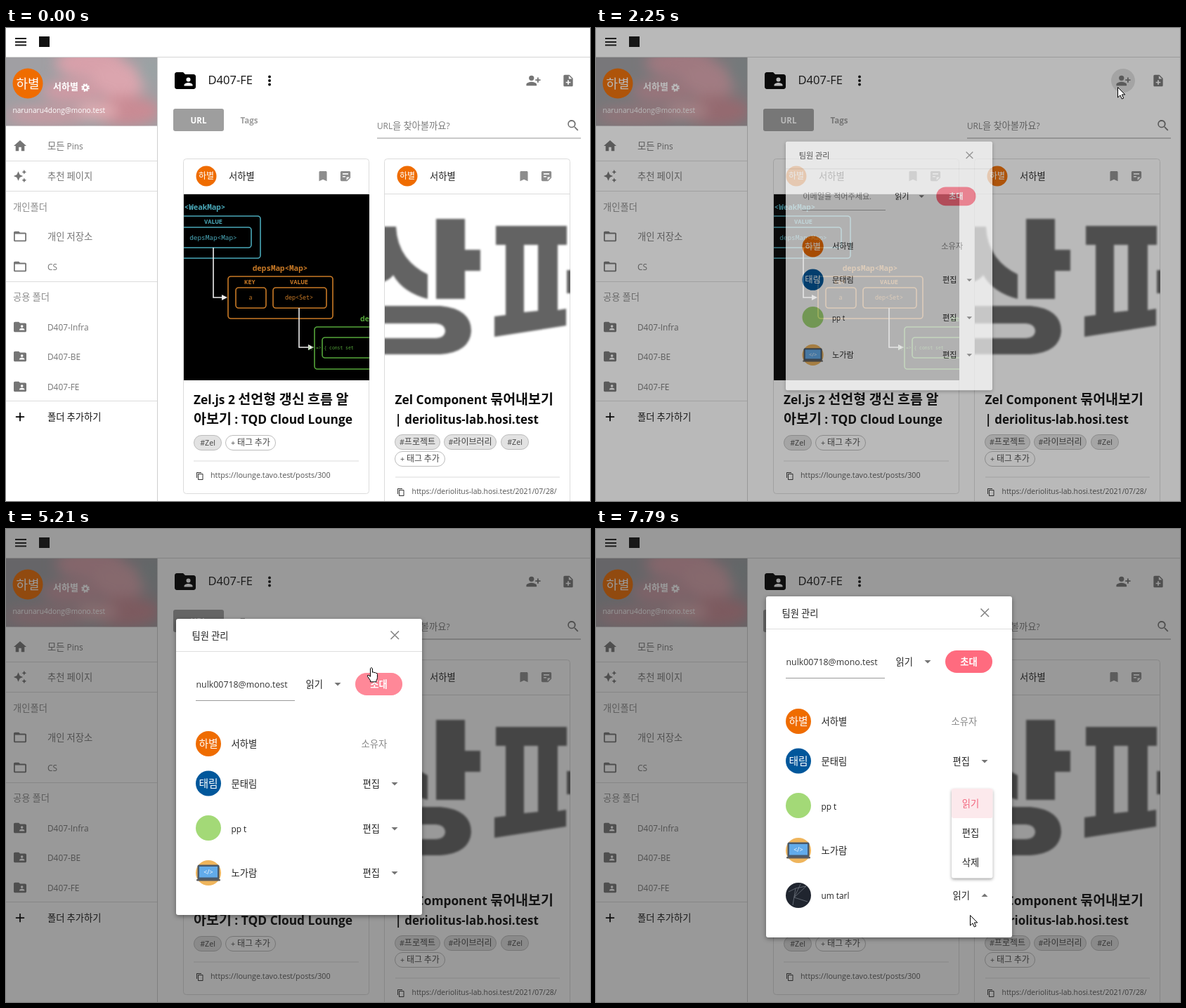
Write an HTML page that moves like this. It is 831 by 674 pixels and loops after 8 s.

```html
<!DOCTYPE html>
<html lang="ko">
<head>
<meta charset="utf-8">
<title>Team invite</title>
<style>
html, body { margin: 0; width: 100%; height: 100%; overflow: hidden; background: #fff; }
svg { display: block; }
text { font-family: "Open Sans", "Noto Sans CJK KR", "Noto Sans CJK JP", sans-serif; }
.code text { font-family: "Noto Sans Mono", "DejaVu Sans Mono", monospace; }
.soft { filter: blur(9px); }
.rough { filter: blur(1.4px); }
#panel { filter: drop-shadow(0 2px 3px rgba(0,0,0,.4)); }
#menu > rect:first-child { filter: drop-shadow(0 2px 2px rgba(0,0,0,.35)); }
</style>
</head>
<body>
<svg id="stage" width="831" height="674"></svg>
<script>
const GREY = '#757575', ORANGE = '#ef6c00', PINK = '#ff6b7f', LINE = '#dcdcdc';
const OWNER = '서하별', MAIL = 'nulk00718@mono.test';

const ICON = {
  home: 'M10 20v-6h4v6h5v-8h3L12 3 2 12h3v8z',
  stars: 'M19 9l1.25-2.75L23 5l-2.75-1.25L19 1l-1.25 2.75L15 5l2.75 1.25zm-7.5.5L9 4 6.5 9.5 1 12l5.5 2.5L9 20l2.5-5.5L17 12zM19 15l-1.25 2.75L15 19l2.75 1.25L19 23l1.25-2.75L23 19l-2.75-1.25z',
  folder: 'M20 6h-8l-2-2H4c-1.1 0-2 .9-2 2v12c0 1.1.9 2 2 2h16c1.1 0 2-.9 2-2V8c0-1.1-.9-2-2-2zm0 12H4V8h16z',
  shared: 'M20 6h-8l-2-2H4c-1.1 0-2 .9-2 2v12c0 1.1.9 2 2 2h16c1.1 0 2-.9 2-2V8c0-1.1-.9-2-2-2zm-5 3a2 2 0 1 1 0 4 2 2 0 1 1 0-4zm4 8h-8v-1c0-1.33 2.67-2 4-2s4 .67 4 2z',
  invite: 'M9 4a4 4 0 1 0 0 8 4 4 0 1 0 0-8zM9 14c-2.67 0-8 1.34-8 4v2h16v-2c0-2.66-5.33-4-8-4zM18 10V7h2v3h3v2h-3v3h-2v-3h-3v-2z',
  addDoc: 'M14 2H6c-1.1 0-2 .9-2 2v16c0 1.1.9 2 2 2h12c1.1 0 2-.9 2-2V8zm2 14h-3v3h-2v-3H8v-2h3v-3h2v3h3zm-3-7V3.5L18.5 9z',
  search: 'M15.5 14h-.8l-.27-.27A6.5 6.5 0 1 0 13.7 14.4l.3.3v.8l5 5L20.5 19zm-6 0a4.5 4.5 0 1 1 0-9 4.5 4.5 0 1 1 0 9z',
  mark: 'M17 3H7c-1.1 0-2 .9-2 2v16l7-3 7 3V5c0-1.1-.9-2-2-2z',
  note: 'M19 3H5a2 2 0 0 0-2 2v14a2 2 0 0 0 2 2h10l6-6V5a2 2 0 0 0-2-2zM7 7h10v2H7zm5 7H7v-2h5zm2 5.5V14h5.5z',
  copy: 'M16 1H4c-1.1 0-2 .9-2 2v14h2V3h12zm3 4H8c-1.1 0-2 .9-2 2v14c0 1.1.9 2 2 2h11c1.1 0 2-.9 2-2V7c0-1.1-.9-2-2-2zm0 16H8V7h11z',
  plus: 'M19 13h-6v6h-2v-6H5v-2h6V5h2v6h6z'
};

// Drawing helpers
const esc = s => s.replace(/&/g, '&amp;').replace(/</g, '&lt;').replace(/>/g, '&gt;');
const text = (x, y, s, size = 13.3, fill = GREY, more = '') =>
  `<text x="${x}" y="${y}" font-size="${size}" fill="${fill}" ${more}>` +
  s.replace(/[ -~]+/g, r => `<tspan font-size="${size * .89}">${esc(r)}</tspan>`) + '</text>';
const mid = 'text-anchor="middle"', bold = 'font-weight="700"';
const rect = (x, y, w, h, fill, more = '') =>
  `<rect x="${x}" y="${y}" width="${w}" height="${h}" fill="${fill}" ${more}/>`;
const disc = (x, y, r, fill, more = '') => `<circle cx="${x}" cy="${y}" r="${r}" fill="${fill}" ${more}/>`;
const path = (d, fill, more = '') => `<path d="${d}" fill="${fill}" ${more}/>`;
const icon = (name, x, y, size, fill = GREY) =>
  path(ICON[name], fill, `fill-rule="evenodd" transform="translate(${x - size / 2} ${y - size / 2}) scale(${size / 24})"`);
const avatar = (x, y, r, s, fill, size) =>
  disc(x, y, r, fill) + text(x, y + size * .37, s, size, '#fff', mid);
const caretDown = (x, y, id = '') => path(`M${x - 4.5} ${y - 2}h9l-4.5 4.5z`, GREY, id);
const chip = (x, y, w, s, plain) =>
  rect(x + .5, y + .5, w - 1, 21, plain ? '#fff' : '#e2e2e2', 'rx="10.5" stroke="#bcbcbc"') +
  text(x + w / 2, y + 15, s, 12, '#444', mid);

function sidebar() {
  const cloud = [[120, 50, 50, 22, '#d8a0aa'], [160, 75, 40, 25, '#dba5ae'], [95, 90, 45, 16, '#cf9aa4'],
    [170, 118, 50, 22, '#c98b94'], [60, 125, 60, 14, '#c59aa2'], [130, 118, 30, 12, '#deacb2'], [205, 60, 18, 22, '#9aa2a4']];
  const rows = [['home', '모든 Pins', 168], ['stars', '추천 페이지', 211], ['folder', '개인 저장소', 297], ['folder', 'CS', 340],
    ['shared', 'D407-Infra', 426], ['shared', 'D407-BE', 468], ['shared', 'D407-FE', 511]];
  return `<svg x="0" y="42" width="215" height="97.5" viewBox="0 42 215 97.5">` + rect(0, 42, 215, 98, '#a09fa3') +
    '<g class="soft">' + cloud.map(([x, y, a, b, c]) => `<ellipse cx="${x}" cy="${y}" rx="${a}" ry="${b}" fill="${c}"/>`).join('') + '</g></svg>' +
    avatar(31, 79, 21.5, OWNER.slice(1), ORANGE, 18) +
    text(67, 88, OWNER, 13, '#fff', bold) +
    disc(113, 85, 3.2, 'none', 'stroke="#fff" stroke-width="2.4"') +
    disc(113, 85, 5, 'none', 'stroke="#fff" stroke-width="1.6" stroke-dasharray="2.2 1.73"') +
    text(9.5, 121, 'narunaru4dong@mono.test', 11.4, '#fff') +
    [189, 232, 361, 531].map(y => rect(0, y, 215, 1, LINE)).join('') +
    rect(215, 42, 1, 632, '#cfcfcf') +
    rows.map(([i, s, y]) => icon(i, 20, y, i == 'stars' ? 20 : 21.6) + text(59, y + 5, s)).join('') +
    text(10, 260, '개인폴더', 13.3, '#8c8c8c') + text(10, 388, '공용 폴더', 13.3, '#8c8c8c') +
    icon('plus', 20, 554, 21, '#000') + text(59, 558.5, '폴더 추가하기', 13.3, '#111');
}

function cardHead(x) {
  return rect(x + .5, 186.5, 264, x < 300 ? 477 : 520, '#fff', `rx="4" stroke="${LINE}"`) +
    avatar(x + 33, 211, 14.5, OWNER.slice(1), ORANGE, 12) + text(x + 65, 215.5, OWNER, 13.3, '#222') +
    icon('mark', x + 199, 211, 19, '#8d8d8d') + icon('note', x + 231, 211, 19, '#8d8d8d') +
    rect(x + 1, 236, 263, 1, LINE);
}

function diagram() {
  const box = (x, y, w, h, c) => rect(x, y, w, h, 'none', `rx="4" stroke="${c}" stroke-width="1.6"`);
  const label = (x, y, s, size, c, more = mid) => `<text x="${x}" y="${y}" font-size="${size}" fill="${c}" ${more}>${esc(s)}</text>`;
  const arrow = (x, y, y2, x2) => path(`M${x} ${y}V${y2}H${x2 - 4}`, 'none', 'stroke="#eee" stroke-width="1.6"') +
    path(`M${x2 - 6} ${y2 - 4}L${x2 + 2} ${y2}L${x2 - 6} ${y2 + 4}z`, '#eee');
  const teal = '#4aa8b8', amber = '#c97a26', green = '#55a63a';
  return `<svg class="code" x="253" y="237" width="264" height="265" viewBox="253 237 264 265">` + rect(253, 237, 264, 265, '#000') +
    label(283, 259, '<WeakMap>', 10.9, teal, mid + ' ' + bold) + box(230, 268, 132, 60, teal) + label(295, 279, 'VALUE', 8.7, teal, mid + ' ' + bold) +
    box(230, 284, 119, 29, teal) + label(295, 302, 'depsMap<Map>', 9.4, teal) +
    arrow(295, 313, 384, 313) +
    label(390, 346, 'depsMap<Map>', 10.9, amber, mid + ' ' + bold) + box(316, 354, 149, 60, amber) +
    label(347, 365, 'KEY', 8.7, amber, mid + ' ' + bold) + label(417, 365, 'VALUE', 8.7, amber, mid + ' ' + bold) +
    box(327, 370, 43, 29, amber) + label(348, 387, 'a', 8.4, amber) +
    box(380, 370, 76, 29, amber) + label(417, 387, 'dep<Set>', 8.4, amber) +
    arrow(417, 399, 455, 436) +
    label(504, 418, 'depsMap', 10.9, green, bold) + box(439, 426, 120, 60, green) +
    box(450, 441, 110, 29, green) + label(462, 458, '() => { const set', 6.4, green) + '</svg>';
}

function zoomedSign() {
  return `<svg x="539" y="237" width="264" height="265" viewBox="539 237 264 265"><g class="rough" fill="#636363">` +
    '<path d="M530 283h25q1 25 14 43 12 16 31 25v35q-35-9-49-34-5 8-21 12z"/>' +
    '<path d="M612 272h41v44h22v30h-22v40h-41z"/>' +
    '<path fill-rule="evenodd" d="M530 396h88q44 4 44 36-2 30-44 33h-88zM530 421v21h82q13-1 13-11-1-9-13-10z"/>' +
    '<path fill-rule="evenodd" d="M697 282h101v27h-13v93l12-2v24l-102 16v-29l16-2v-100h-14zM737 309v96l20-2v-94z"/>' +
    '<path d="M798 345h12v33h-12z"/></g></svg>';
}

function page() {
  const black = '#0b0b0b', title = bold;
  return rect(0, 0, 831, 674, '#fff') + rect(0, 41, 831, 1, '#d4d4d4') +
    [14, 19, 23.5].map(y => rect(13, y, 16, 1.9, '#111')).join('') + rect(47, 12, 15, 15, '#111') + sidebar() +
    icon('shared', 255, 75, 36, '#000') + text(287.5, 80, 'D407-FE', 18.6, '#111', 'font-weight="500"') +
    [69.5, 75, 80.5].map(y => disc(375, y, 2, '#111')).join('') +
    disc(750, 75, 17, '#000', 'id="press" opacity="0"') +
    icon('invite', 750.5, 75, 22) + icon('addDoc', 800, 75, 20) +
    rect(238, 115, 72, 32, '#9e9e9e', 'rx="3"') + text(274, 135.5, 'URL', 13, '#fff', mid + ' ' + bold) +
    text(346, 135.5, 'Tags', 13, '#9e9e9e', mid + ' ' + bold) +
    text(528, 144, 'URL을 찾아볼까요?', 13.3, '#7d7d7d') + icon('search', 807, 139, 21) + rect(528, 156.5, 290, 1, '#949494') +
    cardHead(252) + diagram() +
    text(267, 536, 'Zel.js 2 선언형 갱신 흐름 알', 19.5, black, title) + text(267, 563.5, '아보기 : TQD Cloud Lounge', 19.5, black, title) +
    chip(267, 580, 40, '#Zel') + chip(312, 580, 72, '+ 태그 추가', 1) + rect(267, 616.5, 235, 1, LINE) +
    icon('copy', 276, 638.5, 12, '#333') + text(291, 641, 'https://lounge.tavo.test/posts/300', 12.1, '#555') +
    cardHead(538) + zoomedSign() +
    text(553.5, 536, 'Zel Component 묶어내보기', 19.5, black, title) + text(553.5, 563.5, '| deriolitus-lab.hosi.test', 19, black, title) +
    chip(553, 579, 65, '#프로젝트') + chip(623, 579, 75, '#라이브러리') + chip(704, 579, 40, '#Zel') +
    chip(553, 603, 72, '+ 태그 추가', 1) + rect(554, 639.5, 234, 1, LINE) +
    icon('copy', 562, 661.5, 12, '#333') + text(577.5, 664, 'https://deriolitus-lab.hosi.test/2021/07/28/', 11.7, '#555');
}

function member(y, face, name, role, id = '') {
  return face + text(320.5, y + 5, name, 13.3, '#222') +
    (role == '소유자' ? text(505.5, y + 5, role, 13.3, '#888') : text(507.5, y + 4.5, role, 13.3, '#222') + caretDown(553, y, id));
}

function dialog() {
  const laptop = disc(288, 490, 18, '#efb55c') + rect(272.5, 478.5, 31, 21, '#4a5a6c', 'rx="2"') + rect(275, 481, 26, 15.5, '#62abea') +
    text(288, 492, '</>', 10, '#fff', mid) + rect(271, 499, 34, 2.5, '#5c5c5c', 'rx="1"');
  const night = disc(288, 554, 18, '#20252f') +
    path('M280 568L284 544L299 541L282 557L301 563M274 549L284 544M282 557L291 538', 'none', 'stroke="#6f757f" stroke-width=".8"');
  let squiggle = 'M271 228';
  for (let i = 0; i < 15; i++) squiggle += 'q1-2 2 0t2 0';
  return rect(242, 128, 350, 422, '#fff', 'id="panel" rx="3"') +
    text(264.5, 156.5, '팀원 관리', 13.3, '#222') +
    path('M547.5 145.5l11.5 11.5m0-11.5l-11.5 11.5', 'none', 'stroke="#858585" stroke-width="1.6"') +
    rect(242, 174, 350, 1, '#dedede') +
    `<g id="hint">${text(271, 225.5, '이메일을 적어주세요.', 13.3, '#858585')}</g>` +
    `<g id="mail">${text(270.5, 225.5, MAIL, 13.9, '#333')}</g>` +
    path(squiggle, 'none', 'id="squiggle" stroke="#e8323c" stroke-width="1"') +
    rect(270, 244, 141, 1, '#9a9a9a') + rect(270, 243.5, 141, 2, '#f9566c', 'id="focus"') + rect(270.5, 213, 1.5, 17, '#000', 'id="caret"') +
    text(426.5, 225.5, '읽기', 13.3, '#222') + caretDown(472, 221) +
    rect(497, 205, 67, 32, PINK, 'rx="16"') + rect(497, 205, 67, 32, '#fff', 'id="glow" rx="16" opacity="0"') +
    text(530.5, 225.5, '초대', 13.3, '#fff', mid + ' ' + bold) +
    member(306, avatar(288, 306, 18, OWNER.slice(1), ORANGE, 14.7), OWNER, '소유자') +
    member(363, avatar(288, 362.5, 18, '태림', '#01579b', 14.7), '문태림', '편집') +
    member(427, disc(288, 426, 18, '#a3d977'), 'pp t', '편집') +
    member(490, laptop, '노가람', '편집') +
    `<g id="guest">${member(554, night, 'um tarl', '읽기', 'id="toggle"')}</g>`;
}

function menu() {
  return rect(506, 370, 58.5, 127.5, '#fff', 'rx="3"') + rect(506, 370, 58.5, 42, '#fce9ec', 'rx="3"') +
    ['읽기', '편집', '삭제'].map((s, i) => text(533, 395.5 + i * 42.3, s, 13.3, i ? '#222' : '#f2647c', mid)).join('');
}

const POINTER = {
  arrow: 'M.5 .5V15L4 11.8L6.3 17L8.7 16L6.4 10.9H10.8z',
  hand: 'M-1.5 1.5Q0-1 1.5 1.5V7Q3 5.8 4 7.5Q5.5 6.5 6.5 8Q8.5 7.5 8.5 10V14Q8.5 17 7 18.5V20.5H-1.5V18.5L-5.3 13Q-6.3 10.5-4 11L-1.5 13z',
  beam: 'M-3.5-7.5H-.7V6.5H-3.5V7.5H3.5V6.5H.7V-7.5H3.5V-8.5H-3.5z'
};

const stage = document.getElementById('stage');
stage.innerHTML = page() + rect(0, 0, 831, 674, '#212121', 'id="shade"') +
  `<g id="dialog">${dialog()}</g><g id="menu">${menu()}</g>` +
  path('', '#fff', 'id="pointer" stroke="#000" stroke-linejoin="round"');
const el = {};
stage.querySelectorAll('[id]').forEach(n => el[n.id] = n);
const set = (id, name, value) => el[id].setAttribute(name, value);
const show = (id, on) => set(id, 'visibility', on ? 'visible' : 'hidden');

// Pointer path: time, x, y
const MOVES = [[490, 824, 66], [630, 820, 76], [1160, 820, 76], [1230, 786, 160], [1300, 776, 199], [1400, 776, 199],
  [1575, 743.5, 85], [2130, 743.5, 85], [2180, 742, 84], [2320, 742, 84], [2590, 517, 196], [2680, 517, 196], [2760, 432, 232],
  [2960, 381, 239], [3080, 381, 239], [3240, 383.5, 242.5], [4000, 383.5, 242.5], [4600, 521, 211], [5000, 521, 211],
  [5400, 519, 185], [5660, 519, 185], [6300, 532.5, 525], [7450, 532.5, 525], [7780, 532, 550]];
const SHAPES = [[490, 'arrow'], [1540, 'hand'], [2150, 'arrow'], [2800, 'beam'], [4120, 'arrow'], [4460, 'hand'],
  [5770, 'arrow'], [6230, 'hand'], [7200, 'arrow']];

const clamp = v => Math.min(1, Math.max(0, v));
const ramp = (t, from, span) => clamp((t - from) / span);

// cubic-bezier(.25, .8, .5, 1)
function ease(x) {
  let lo = 0, hi = 1;
  const curve = (s, a, b) => 3 * (1 - s) * (1 - s) * s * a + 3 * (1 - s) * s * s * b + s * s * s;
  for (let i = 0; i < 20; i++) {
    const s = (lo + hi) / 2;
    if (curve(s, .25, .5) < x) lo = s; else hi = s;
  }
  return x <= 0 ? 0 : x >= 1 ? 1 : curve(lo, .8, 1);
}

function movePointer(t) {
  show('pointer', t >= 490);
  if (t < 490) return;
  const shape = SHAPES.filter(s => s[0] <= t).pop()[1];
  const next = MOVES.findIndex(m => m[0] > t);
  const b = MOVES[next < 0 ? MOVES.length - 1 : next], a = next < 0 ? b : MOVES[next - 1];
  const k = a === b ? 0 : (t - a[0]) / (b[0] - a[0]);
  set('pointer', 'd', POINTER[shape]);
  set('pointer', 'stroke-width', shape == 'beam' ? .7 : 1);
  set('pointer', 'transform', `translate(${a[1] + (b[1] - a[1]) * k} ${a[2] + (b[2] - a[2]) * k})`);
}

function draw(t) {
  const open = ease(ramp(t, 2160, 300)), grown = t >= 5280, pasted = t >= 3830;
  const focused = t >= 2475 && t < 4940;

  set('press', 'r', 17 * ease(ramp(t, 1990, 220)));
  set('press', 'opacity', t < 2000 ? 0 : .12 * (1 - ramp(t, 2300, 200)));
  set('shade', 'opacity', .46 * open);

  const scale = .5 + .5 * open;
  show('dialog', open > 0);
  set('dialog', 'opacity', open);
  set('dialog', 'transform', grown ? 'translate(0 -32)' : `translate(417 339) scale(${scale}) translate(-417 -339)`);
  set('panel', 'height', grown ? 486 : 422);
  set('guest', 'display', grown ? 'inline' : 'none');

  set('hint', 'display', pasted ? 'none' : 'inline');
  set('mail', 'display', pasted ? 'inline' : 'none');
  set('squiggle', 'display', pasted && focused ? 'inline' : 'none');
  const width = focused ? 141 * ease(ramp(t, 2475, 300)) : 0;
  set('focus', 'width', width);
  set('focus', 'x', 340.5 - width / 2);
  const blinkOn = t < 2960 || (t >= 3500 && t < 4360);
  set('caret', 'display', focused && blinkOn ? 'inline' : 'none');
  set('caret', 'x', pasted ? 400.8 : 270.5);

  const hover = t >= 4460 && t < 5560 ? .08 : 0;
  const click = t >= 4940 ? .2 * (1 - ramp(t, 5060, 350)) : 0;
  set('glow', 'opacity', hover + click);

  const drop = ease(ramp(t, 7170, 300));
  show('menu', drop > 0);
  set('menu', 'opacity', drop);
  set('toggle', 'transform', t >= 7130 ? 'rotate(180 553 554)' : '');
  movePointer(t);
}

function tick() {
  draw(performance.now() % 8000);
  requestAnimationFrame(tick);
}
tick();
</script>
</body>
</html>
```
